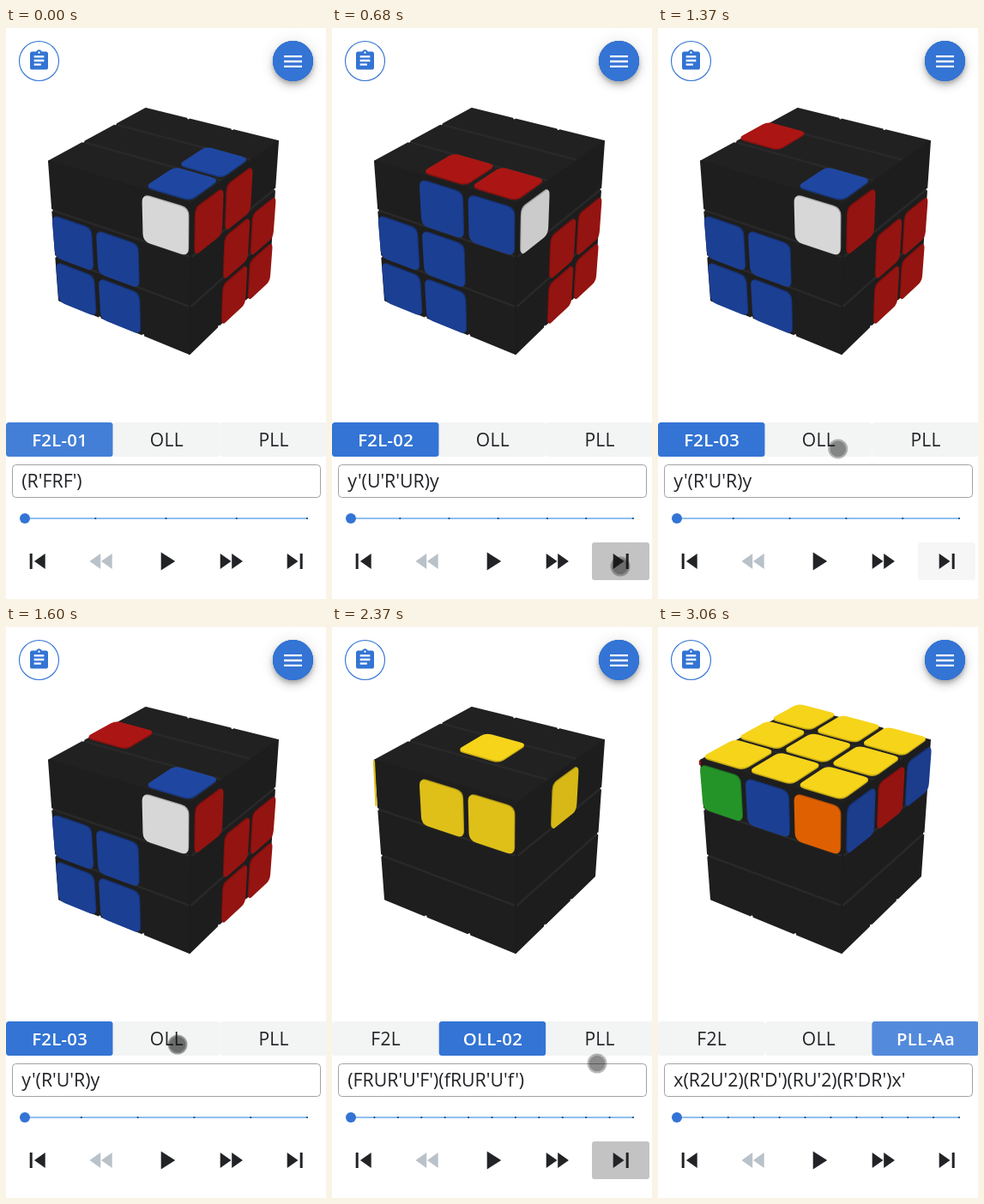
Write an HTML page with a canvas that moves like this. It is 373 px wide and 666 px high and loops after 3540 ms.

```html
<!DOCTYPE html>
<html lang="en">
<head>
<meta charset="utf-8">
<title>Cube algorithm trainer</title>
<style>
  html, body { margin: 0; width: 100%; height: 100%; overflow: hidden; background: #fff; }
  canvas { display: block; width: 373px; height: 666px; }
</style>
</head>
<body>
<canvas id="stage"></canvas>
<script>
const W = 373, H = 666, LOOP = 3540, STEP = 230 / 3;
const TAB_W = 124.7;
const BLUE = '#3374d4', INK = '#212326';
const FONT = '"Open Sans", "Noto Sans", sans-serif';

const canvas = document.getElementById('stage');
const ctx = canvas.getContext('2d');
const ratio = window.devicePixelRatio || 1;
canvas.width = W * ratio;
canvas.height = H * ratio;

// Stickers are row-major strings; top rows run from the front-left edge backwards.
const F2L_SIDE = 'bb.bb.', F2L_RIGHT = '.rr.rr';
const scenes = [
  { t: 0, tab: 0, label: 'F2L-01', alg: "(R'FRF')", moves: 4,
    top: '..b..b', left: '..w' + F2L_SIDE, right: 'rr.' + F2L_RIGHT },
  { t: 600, tab: 0, label: 'F2L-02', alg: "y'(U'R'UR)y", moves: 6,
    top: '.rr', left: '.bb' + F2L_SIDE, right: 'w..' + F2L_RIGHT },
  { t: 910, tab: 0, label: 'F2L-03', alg: "y'(R'U'R)y", moves: 5,
    top: '..br', left: '..w' + F2L_SIDE, right: 'r..' + F2L_RIGHT },
  { t: 1675, tab: 1, label: 'OLL-01', alg: "(RU'2)(R2'FRF')U2(R'FRF')", moves: 11,
    top: '....y', left: '.y.', right: 'yyy', back: 'y' },
  { t: 2205, tab: 1, label: 'OLL-02', alg: "(FRUR'U'F')(fRUR'U'f')", moves: 12,
    top: '....y', left: '.yy', right: '.y.', back: 'y' },
  { t: 2750, tab: 2, label: 'PLL-Aa', alg: "x(R2U'2)(R'D')(RU'2)(R'DR')x'", moves: 11,
    top: 'yyyyyyyyy', left: 'gbo', right: 'brb', back: 'r' }
];

// Sticker colours as seen on the top, left and right faces
const paint = {
  b: ['#1f47a2', '#1b3f93', '#1c3c8c'],
  r: ['#ab1614', '#a01412', '#941411'],
  y: ['#f6d41a', '#dfc018', '#d8b817'],
  w: ['#e6e6e6', '#d7d7d7', '#cbcbcb'],
  g: ['#2aa52c', '#259428', '#208523'],
  o: ['#f06a00', '#df6000', '#cc5800']
};

const path = [
  [130, 323.5, 648.5], [207, 326, 640], [283, 330, 632], [360, 331.5, 628.5],
  [530, 335, 628], [680, 336, 628], [990, 336, 628], [1080, 328, 617],
  [1370, 210, 491], [1520, 200, 487], [1680, 200, 487], [1910, 324.5, 620],
  [2060, 330, 624], [2210, 331, 624], [2370, 309, 509], [2600, 304, 489], [2830, 304, 488]
];
const GONE = 2980;
const presses = [530, 905, 2140];
const taps = [[1595, 200, 487], [2675, 304, 488]];

const icons = {
  clip: 'M19 3h-4.18C14.4 1.84 13.3 1 12 1s-2.4.84-2.82 2H5c-1.1 0-2 .9-2 2v14c0 1.1.9 2 2 2h14c1.1 0 2-.9 2-2V5c0-1.1-.9-2-2-2zm-7 0c.55 0 1 .45 1 1s-.45 1-1 1-1-.45-1-1 .45-1 1-1zm2 14H7v-2h7v2zm3-4H7v-2h10v2zm0-4H7V7h10v2z',
  menu: 'M3 18h18v-2H3v2zm0-5h18v-2H3v2zm0-7v2h18V6H3z',
  controls: [
    'M6 6h2v12H6zm3.5 6l8.5 6V6z',
    'M11 18V6l-8.5 6 8.5 6zm.5-6l8.5 6V6l-8.5 6z',
    'M8 5v14l11-7z',
    'M4 18l8.5-6L4 6v12zm9-12v12l8.5-6L13 6z',
    'M6 18l8.5-6L6 6v12zM16 6v12h2V6h-2z'
  ]
};

const clamp = x => Math.max(0, Math.min(1, x));
const mix = (a, b, p) => a + (b - a) * p;
const easeOut = x => 1 - Math.pow(1 - clamp(x), 3);

// Maps the unit square onto a quad with perspective
function project([a, b, c, d]) {
  const dx1 = b[0] - c[0], dy1 = b[1] - c[1], dx2 = d[0] - c[0], dy2 = d[1] - c[1];
  const sx = a[0] - b[0] + c[0] - d[0], sy = a[1] - b[1] + c[1] - d[1];
  const det = dx1 * dy2 - dy1 * dx2;
  const g = (sx * dy2 - dx2 * sy) / det, h = (dx1 * sy - dy1 * sx) / det;
  return (u, v) => [0, 1].map(k =>
    ((b[k] - a[k] + g * b[k]) * u + (d[k] - a[k] + h * d[k]) * v + a[k]) / (g * u + h * v + 1));
}

const P = {
  L: [50, 155.5], F: [216, 205], R: [317, 132], T: [163, 94],
  B: [214, 380], BL: [62, 317.5], BR: [306, 290.5]
};
const faces = [
  { key: 'top', body: [P.L, P.F, P.R, P.T], fill: '#212121', rim: [0, 1.6],
    map: project([[46, 151.8], [216, 203], [319.5, 128.7], [162.7, 87.6]]) },
  { key: 'left', body: [P.L, P.F, P.B, P.BL], fill: '#1e1e1e', rim: [1, -1],
    map: project([[45.3, 156.2], [216, 208.2], [214.6, 384.5], [59.2, 321]]) },
  { key: 'right', body: [P.F, P.R, P.BR, P.B], fill: '#1d1d1d', rim: [-1, -0.9],
    map: project([[218.9, 208.3], [321, 134], [309, 296.5], [216.3, 383]]) }
];
faces.forEach(f => { f.grid = project(f.body); });

function line(a, b, color, width) {
  ctx.strokeStyle = color;
  ctx.lineWidth = width;
  ctx.beginPath();
  ctx.moveTo(...a);
  ctx.lineTo(...b);
  ctx.stroke();
}

function disc(x, y, r, color) {
  ctx.fillStyle = color;
  ctx.beginPath();
  ctx.arc(x, y, r, 0, 7);
  ctx.fill();
}

function box(x, y, w, h, r, color) {
  ctx.fillStyle = color;
  ctx.beginPath();
  ctx.roundRect(x, y, w, h, r);
  ctx.fill();
}

function icon(d, x, y, scale, color) {
  ctx.save();
  ctx.translate(x - 12 * scale, y - 12 * scale);
  ctx.scale(scale, scale);
  ctx.fillStyle = color;
  ctx.fill(new Path2D(d));
  ctx.restore();
}

function stickerPath(map, col, row) {
  const at = (x, y) => map((col + x) / 3, (row + y) / 3);
  const lo = 0.056, hi = 1 - lo, r = 0.14;
  const corners = [[lo, lo, 0, r, r, 0], [hi, lo, -r, 0, 0, r], [hi, hi, 0, -r, -r, 0], [lo, hi, r, 0, 0, -r]];
  ctx.beginPath();
  for (const [x, y, ax, ay, bx, by] of corners) {
    ctx.lineTo(...at(x + ax, y + ay));
    ctx.quadraticCurveTo(...at(x, y), ...at(x + bx, y + by));
  }
  ctx.closePath();
}

function drawBody() {
  ctx.lineJoin = 'round';
  for (const f of faces) {
    ctx.beginPath();
    f.body.forEach(p => ctx.lineTo(...p));
    ctx.closePath();
    ctx.fillStyle = ctx.strokeStyle = f.fill;
    ctx.lineWidth = 2;
    ctx.fill();
    ctx.stroke();
  }
  for (const f of faces) {
    for (const k of [1 / 3, 2 / 3]) line(f.grid(0.01, k), f.grid(0.99, k), '#292929', 2.4);
  }
  const [top, left, right] = faces.map(f => f.grid);
  for (const k of [1 / 3, 2 / 3]) {
    const ends = [[top(0, k), -1, -1], [top(k, 1), 1, -1], [left(0, k), -1, 0],
      [left(k, 1), 0, 1], [right(1, k), 1, 0], [right(k, 1), 1, 1]];
    for (const [[x, y], ox, oy] of ends) disc(x + ox, y + oy, 1.4, '#fff');
  }
}

function drawCube(scene) {
  drawBody();
  if (scene.back) {
    const long = scene.back === 'y';
    line([48.9, 155.5], long ? [51.6, 209] : [49, 161], paint[scene.back][1], 2.2);
  }
  faces.forEach((f, side) => {
    [...scene[f.key]].forEach((c, i) => {
      if (c === '.') return;
      const col = i % 3, row = Math.floor(i / 3);
      ctx.fillStyle = paint[c][side];
      ctx.save();
      ctx.translate(...f.rim);
      stickerPath(f.map, col, row);
      ctx.fill();
      ctx.fillStyle = 'rgba(0,0,0,.2)';
      ctx.fill();
      ctx.restore();
      ctx.fillStyle = paint[c][side];
      stickerPath(f.map, col, row);
      ctx.fill();
    });
  });
}

function drawHeader() {
  disc(38.5, 38.5, 23, '#fff');
  ctx.strokeStyle = BLUE;
  ctx.lineWidth = 1.1;
  ctx.stroke();
  icon(icons.clip, 38.5, 38, 28 / 24, BLUE);
  ctx.save();
  for (const [dy, blur, alpha] of [[3, 5, 0.2], [6, 10, 0.14], [1, 18, 0.12]]) {
    ctx.shadowColor = `rgba(0,0,0,${alpha})`;
    ctx.shadowBlur = blur * ratio;
    ctx.shadowOffsetY = dy * ratio;
    disc(334.5, 38.5, 23.5, BLUE);
  }
  ctx.restore();
  icon(icons.menu, 334.5, 39, 28 / 24, '#fff');
}

// White veil over the active tab
function tabGlow(t) {
  if (t < 600) return 0.08;
  if (t < 1675) return 0;
  if (t < 2140) return 0.11;
  if (t < 2750) return 0;
  return mix(0.03, 0.16, clamp((t - 2840) / 150));
}

function drawTabs(scene, t) {
  ctx.textAlign = 'center';
  ['F2L', 'OLL', 'PLL'].forEach((name, i) => {
    const on = i === scene.tab, x = i * TAB_W;
    box(x, 460, TAB_W, 40, 3.5, on ? BLUE : '#f3f4f4');
    if (on) box(x, 460, TAB_W, 40, 3.5, `rgba(255,255,255,${tabGlow(t)})`);
    ctx.font = on ? `600 20.3px ${FONT}` : `400 21px ${FONT}`;
    ctx.letterSpacing = '0.3px';
    ctx.fillStyle = on ? '#fff' : INK;
    ctx.fillText(on ? scene.label : name, x + TAB_W / 2 + 0.3, 488);
  });
  ctx.letterSpacing = '0px';
  for (const [start, x, y] of taps) {
    const age = t - start;
    if (age < 0 || age > 300) continue;
    const i = Math.floor(x / TAB_W), on = i === scene.tab;
    const alpha = 0.2 * (1 - clamp((age - 160) / 140));
    ctx.save();
    ctx.beginPath();
    ctx.rect(i * TAB_W, 460, TAB_W, 40);
    ctx.clip();
    disc(x, y, mix(8, 26, easeOut(age / 150)), on ? `rgba(255,255,255,${alpha})` : `rgba(0,0,0,${alpha})`);
    ctx.restore();
  }
}

function drawInput(scene) {
  ctx.beginPath();
  ctx.roundRect(7.5, 509.5, 359, 38, 4);
  ctx.strokeStyle = '#a2a2a2';
  ctx.lineWidth = 1;
  ctx.stroke();
  ctx.textAlign = 'left';
  ctx.font = `400 21.3px ${FONT}`;
  ctx.fillStyle = INK;
  ctx.fillText(scene.alg, 18.3, 536);
}

function drawSlider(scene, before, t) {
  const x0 = 22, len = 329, y = 572;
  line([x0, y], [x0 + len, y], '#8fbff1', 2);
  const p = before ? easeOut((t - scene.t) / 150) : 1;
  for (let i = 1; i <= scene.moves; i++) {
    const goal = i / scene.moves;
    const from = before && i <= before.moves ? i / before.moves : goal;
    box(x0 + len * mix(from, goal, p) - 1, y - 1, 2, 2, 0.8, '#24466b');
  }
  disc(x0, y, 6, BLUE);
}

function nextShade(t) {
  if (t < presses[0] || t >= 2910) return 0;
  if (t >= 1600 && t < presses[2]) return 0;
  const age = t - presses.filter(p => p <= t).pop();
  return mix(0.235, 0.035, clamp((age - 240) / 210));
}

function drawControls(t) {
  box(303, 600, 67, 44, 3, `rgba(0,0,0,${nextShade(t)})`);
  icons.controls.forEach((d, i) => icon(d, 36.7 + 75 * i, 622, 1.5, i === 1 ? '#b9c1c9' : INK));
}

function drawPointer(t) {
  if (t < 130 || t >= GONE) return;
  let i = path.findIndex(k => k[0] > t);
  if (i < 0) i = path.length;
  const a = path[i - 1], b = path[i] || a;
  const p = a === b ? 0 : (t - a[0]) / (b[0] - a[0]);
  const x = mix(a[1], b[1], p), y = mix(a[2], b[2], p);
  disc(x, y, 11.5, 'rgba(20,20,20,.3)');
  disc(x, y, 9.3, 'rgba(20,20,20,.27)');
}

// The picture is refreshed on a coarse clock
function snap(t) {
  if (t < 130) return 0;
  const start = t < 530 ? 130 : 530;
  const q = start + STEP * Math.floor((t - start + 4) / STEP);
  return t < 530 ? Math.min(q, 360) : q;
}

function draw(time) {
  const t = snap(time);
  const n = scenes.filter(s => s.t <= t).length - 1;
  const scene = scenes[n];
  ctx.setTransform(ratio, 0, 0, ratio, 0, 0);
  ctx.fillStyle = '#fff';
  ctx.fillRect(0, 0, W, H);
  drawHeader();
  drawCube(scene);
  drawTabs(scene, t);
  drawInput(scene);
  drawSlider(scene, scenes[n - 1], t);
  drawControls(t);
  drawPointer(t);
}

const begin = performance.now();
function tick() {
  draw((performance.now() - begin) % LOOP);
  requestAnimationFrame(tick);
}
tick();
</script>
</body>
</html>
```
